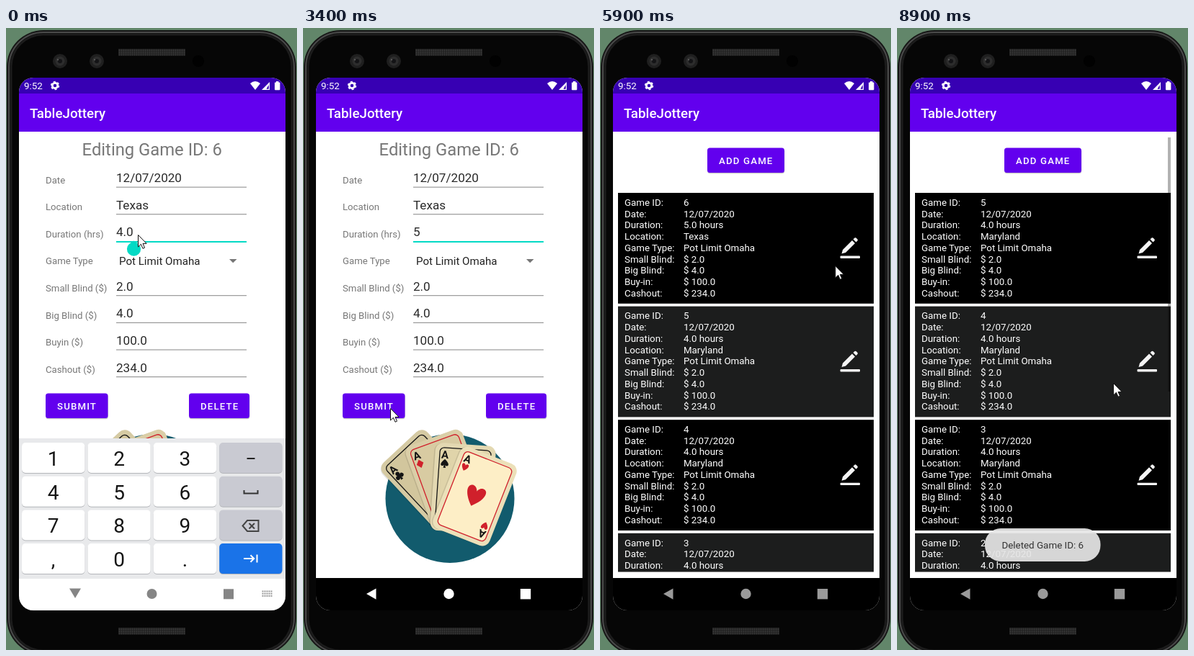
Recreate the animation shown at these times as an HTML page. Size 404x864 px, loop 9000 ms.

```html
<!DOCTYPE html>
<html lang="en">
<head>
<meta charset="utf-8">
<title>Game log</title>
<style>
html, body { margin: 0; width: 100%; height: 100%; overflow: hidden; background: #62866a; }
svg { display: block; width: 404px; height: 864px; font-family: Roboto, sans-serif; }
text { white-space: pre; }
</style>
</head>
<body>
<svg id="stage" viewBox="0 0 404 864" xmlns="http://www.w3.org/2000/svg"></svg>
<script>
const LOOP = 9000, STEP = 100;
const PURPLE = '#6200ee', TEAL = '#03dac5';
const stage = document.getElementById('stage');
const $ = id => document.getElementById(id);

const rect = (x, y, w, h, fill, rx = 0, more = '') =>
  `<rect x="${x}" y="${y}" width="${w}" height="${h}" fill="${fill}" rx="${rx}" ${more}/>`;
const text = (x, y, size, fill, str, more = '') =>
  `<text x="${x}" y="${y}" font-size="${size}" fill="${fill}" ${more}>${str}</text>`;
const path = (d, fill, more = '') => `<path d="${d}" fill="${fill}" ${more}/>`;
const disc = (x, y, r, fill, more = '') => `<circle cx="${x}" cy="${y}" r="${r}" fill="${fill}" ${more}/>`;
const group = (id, inner, more = '') => `<g id="${id}" ${more}>${inner}</g>`;

// phone body
function phone() {
  const grille = y => rect(156, y, 93, 9.5, '#222') + rect(156, y, 93, 9.5, 'url(#mesh)');
  const camera = x => disc(x, 46, 10, '#1f1f1f') + disc(x, 46, 6.5, '#2d2d2d') + disc(x, 46, 3, '#141416') +
    disc(x - 3, 44, 1.2, '#555');
  return rect(1, 3, 402, 868, '#151515', 51) +
    rect(4, 6, 396, 862, 'none', 48, 'stroke="#4a4a4a" stroke-width="2"') +
    rect(6, 8, 392, 858, '#1c1c1c', 46) + rect(8.5, 10.5, 387, 853, '#060606', 43) +
    grille(29) + grille(833) + camera(75) + camera(126) + disc(267, 46, 8, '#010101');
}

// page = coloured bars plus its own content
const page = (id, inner) => group(id,
  rect(18, 69, 370, 740, '#fff') + rect(18, 69, 370, 23, '#3700b3') + rect(18, 91, 370, 53, PURPLE) +
  rect(18, 764, 370, 45, '#000') +
  text(33, 125, 18.8, '#fff', 'TableJottery', 'font-weight="500"') + inner);

const button = (x, y, w, label) =>
  rect(x + .3, y + 1.2, w, 34.5, '#00000038', 3.5) + rect(x, y, w, 34.5, PURPLE, 3.5) +
  text(x + 16, y + 22, 13.2, '#fff', label, 'font-weight="500" letter-spacing="1.18"');

const RED = '#d0202b', INK = '#141414';
const SUITS = {
  heart: 'M0 5C-6-.5-5.5-5-2.7-5-1-5 0-3.2 0-2.6 0-3.2 1-5 2.7-5 5.5-5 6-.5 0 5Z',
  diamond: 'M0-6 5 0 0 6-5 0Z',
  spade: 'M0-6C7 0 6 3.5 3.2 3.5 1.6 3.5.8 2.4.6 1.8L1.8 6H-1.8L-.6 1.8C-.8 2.4-1.6 3.5-3.2 3.5-6 3.5-7 0 0-6Z',
  club: 'M-1.6-1.4A2.9 2.9 0 1 1 1.6-1.4 2.9 2.9 0 1 1 .8 2.4L1.8 6H-1.8L-.8 2.4A2.9 2.9 0 1 1-1.6-1.4Z'
};

function card(x, y, turn, suit, ink, rim, face) {
  const corner = text(13.8, 21.5, 15, INK, 'A', 'font-weight="700" text-anchor="middle"') +
    path(SUITS[suit], ink, 'transform="translate(14.2 28.4)"');
  const front = suit === 'heart'
    ? path(SUITS.heart, ink, 'transform="translate(42 61) scale(2.8)"') +
      `<g transform="rotate(180 42 61)">${corner}</g>` : '';
  return `<g transform="translate(${x} ${y}) rotate(${turn})">` +
    rect(-1.5, .5, 84, 122, '#0000001c', 11) + rect(0, 0, 84, 122, rim, 11) +
    rect(6.5, 6.5, 71, 109, face, 6, `stroke="${ink}" stroke-width="1.3"`) + corner + front + '</g>';
}

const art = disc(204, 653.5, 89.5, '#125b6d') +
  card(104, 611, -43, 'club', INK, '#d5caa3', '#d2c69d') +
  card(139.5, 583.5, -20, 'diamond', RED, '#dacea7', '#d8cba2') +
  card(184.5, 575.5, 4, 'spade', INK, '#e3d8b1', '#e0d4aa') +
  card(221.8, 578.5, 21.5, 'heart', RED, '#ece0b9', '#fdeec6');

const FIELDS = [['Date', '12/07/2020'], ['Location', 'Texas'], ['Duration (hrs)', ''],
  ['Game Type', 'Pot Limit Omaha'], ['Small Blind ($)', '2.0'], ['Big Blind ($)', '4.0'],
  ['Buyin ($)', '100.0'], ['Cashout ($)', '234.0']];

function editPage() {
  const rows = FIELDS.map(([label, value], i) => {
    const dy = i * 37.65;
    const name = text(55, 215.5 + dy, 13.2, '#777', label);
    if (i === 3) return name + text(157, 329, 15.1, '#222', value) + path('M310 321H320.5L315.2 326.3Z', '#757575');
    return name + text(153, 214 + dy, 17.1, '#2a2a2a', value, `id="value${i}"`) +
      rect(153, 220.6 + dy, 181, 1, '#858585', 0, `id="line${i}"`);
  }).join('');
  return page('edit',
    text(202.7, 177, 23.8, '#777', 'Editing Game ID: 6', 'text-anchor="middle"') + rows +
    rect(153, 296, 181, 2, TEAL, 0, 'id="focus"') + rect(0, 276.5, 2, 17, TEAL, 0, 'id="caret" opacity=".75"') +
    path('M177.5 295.5L184 300A9.6 9.6 0 1 1 171 300Z', TEAL, 'id="handle"') +
    button(55, 507.5, 86.5, 'SUBMIT') + button(254, 507.5, 84, 'DELETE') + art);
}

const LABELS = ['Game ID:', 'Date:', 'Duration:', 'Location:', 'Game Type:', 'Small Blind:', 'Big Blind:', 'Buy-in:', 'Cashout:'];

function listRow(id, n) {
  const first = id === 6;
  const values = [id, '12/07/2020', first ? '5.0 hours' : '4.0 hours', first ? 'Texas' : 'Maryland',
    'Pot Limit Omaha', '$ 2.0', '$ 4.0', '$ 100.0', '$ 234.0'];
  const lines = LABELS.map((label, i) =>
    text(34, 246.8 + i * 15.75, 13.3, '#fff', label) + text(116, 246.8 + i * 15.75, 13.3, '#fff', values[i])).join('');
  const pencil = path('M335.5 313.5L337 308 350 295 354 299 341 312ZM351.5 293.5L353.5 291.5Q354.5 290.8 355.5 291.5L357.5 293.5Q358.2 294.5 357.5 295.5L355.5 297.5Z', '#f4f4f4') +
    rect(333.5, 316.5, 27.5, 3.4, '#f4f4f4', 1);
  return `<g transform="translate(0 ${n * 157.6})">` + rect(25, 229, 355, 153.8, n % 2 ? '#1c1d1d' : '#000') + lines + pencil + '</g>';
}

const listPage = (id, top) => page(id,
  button(149, 166.5, 107, 'ADD GAME') +
  `<g clip-path="url(#rows)">${[0, 1, 2, 3].map(n => listRow(top - n, n)).join('')}</g>` +
  rect(376, 152, 4, 353, '#000', 0, `id="${id}Bar"`));

function keyboard() {
  const rows = ['123', '456', '789', ',0.'];
  let out = rect(18, 570, 370, 195, '#e8e9eb');
  rows.forEach((row, r) => {
    const y = 576 + r * 46.7;
    for (let c = 0; c < 4; c++) {
      const x = 22 + c * 91.4;
      out += rect(x, y + 1, 87.3, 42, '#b4b6ba', 5) +
        rect(x, y, 87.3, 42, c < 3 ? '#fff' : r < 3 ? '#c9cad2' : '#1a73e8', 5);
      if (c < 3) out += text(x + 43.6, y + 32, 28, '#151515', row[c], 'text-anchor="middle"');
    }
  });
  const line = (d, color) => path(d, 'none', `stroke="${color}" stroke-width="2"`);
  return out + line('M334.5 598H345.5', '#222') + line('M330.5 642V646.5H349.5V642', '#333') +
    line('M335 684H350.5V699H335L328.5 691.5ZM337.5 688L345 695.5M345 688L337.5 695.5', '#444') +
    line('M330 737H344M339.5 732.2L344.3 737 339.5 741.8M348.5 731.5V742.5', '#fff');
}

const lightNav = rect(18, 765, 370, 44, '#fff') + path('M88 778.5H104L96 792Z', '#858585') +
  disc(202.5, 786, 7, '#858585') + rect(302, 779.3, 14, 14, '#858585') +
  [0, 1, 2].map(r => [0, 1, 2, 3, 4].map(c => rect(355.5 + c * 3, 781.5 + r * 3.2, 2, 2, '#999')).join('')).join('');

const darkNav = path('M88 786L101.5 778.5V793.8Z', 'inherit') + disc(202.5, 786, 7.2, 'inherit') +
  rect(301.8, 779, 14.4, 14.4, 'inherit');

const status = text(25, 85, 13.4, '#fff', '9:52') +
  disc(68, 80, 3.7, 'none', 'stroke="#fff" stroke-width="2.8"') +
  disc(68, 80, 5.4, 'none', 'stroke="#fff" stroke-width="1.6" stroke-dasharray="2.9 2.75"') +
  path('M339 77Q346 71 353 77L346 86Z', '#fff') + path('M355 86H366V75Z', '#fff') + path('M361.5 84.8H364.8V79Z', '#3700b3') +
  rect(373, 75.5, 7.4, 10.7, '#fff', 1) + rect(375, 74, 3.4, 2, '#fff');

const toast = (id, x, w, str) => group(id,
  rect(x, 695, w, 46, '#e6e6e6', 22, 'opacity=".92"') +
  text(x + w / 2, 723, 13.4, '#333', str, 'text-anchor="middle"'));

stage.innerHTML = `<defs>
  <clipPath id="screen"><rect x="18" y="69" width="370" height="740" rx="20"/></clipPath>
  <clipPath id="rows"><rect x="18" y="144" width="370" height="611.5"/></clipPath>
  <pattern id="mesh" width="3" height="3" patternUnits="userSpaceOnUse"><circle cx="1.5" cy="1.5" r=".9" fill="#3a3a3a"/></pattern>
</defs>` + rect(0, 0, 404, 864, '#62866a') + phone() +
  `<g clip-path="url(#screen)">` + rect(18, 69, 370, 740, '#000') +
  group('pages', editPage() + listPage('listA', 6) + listPage('listB', 5)) +
  group('darkNav', darkNav) + group('keys', keyboard()) + group('lightNav', lightNav) +
  status + toast('saved', 88, 228.5, 'Successful Edits to Game ID: 6') + toast('deleted', 122, 160.5, 'Deleted Game ID: 6') + '</g>' +
  path('M0 0V16.5L3.9 12.8 6.5 18.8 9 17.7 6.5 11.9H11.6Z', '#fff', 'id="cursor" stroke="#111" stroke-width="1"');

const clamp = v => Math.max(0, Math.min(1, v));
const ramp = (t, a, b) => clamp((t - a) / (b - a));
const smooth = v => v * v * (3 - 2 * v);
const show = (id, alpha) => $(id).setAttribute('opacity', +alpha);

function bezier(x, [x0, y0, x1, y1, x2, y2, x3, y3]) {
  const at = (a, b, c, d, u) => ((1 - u) ** 3) * a + 3 * u * (1 - u) ** 2 * b + 3 * u * u * (1 - u) * c + u ** 3 * d;
  let lo = 0, hi = 1;
  for (let i = 0; i < 24; i++) {
    const mid = (lo + hi) / 2;
    if (at(x0, x1, x2, x3, mid) < x) lo = mid; else hi = mid;
  }
  return at(y0, y1, y2, y3, lo);
}
// quick start, very long settle
const settle = x => x <= 0 ? 0 : x >= 1 ? 1 : x < 1 / 6
  ? bezier(x, [0, 0, .05, 0, .1333, .06, .1667, .4])
  : bezier(x, [.1667, .4, .2083, .82, .25, 1, 1, 1]);

const POINTER = [[0, 183, 287], [1800, 183, 287], [2400, 95, 783], [2800, 95, 783], [3300, 121, 528],
  [3700, 121, 528], [4200, 165, 562], [5100, 165, 562], [6100, 345, 303], [6600, 345, 303],
  [6800, 314, 377], [7200, 306, 517], [7900, 306, 517], [8500, 300, 493], [9000, 300, 493]];
const SCREENS = [[-1000, 'edit'], [3640, 'listA'], [6615, 'edit'], [7749, 'listB']];
const TYPED = [[0, '4.0'], [300, '4.'], [500, '4'], [700, ''], [900, '5'], [6600, '5.0']];

const latest = (list, t) => list.reduce((k, item, i) => item[0] <= t ? i : k, 0);

function zoom(id, s, alpha) {
  $(id).setAttribute('transform', `translate(203 439) scale(${s}) translate(-203 -439)`);
  show(id, alpha);
}

function drawPages(t) {
  const k = latest(SCREENS, t), [start, top] = SCREENS[k];
  const dt = t - start, e = settle(dt / 400);
  ['edit', 'listA', 'listB'].forEach(id => show(id, 0));
  if (k && dt < 400) zoom(SCREENS[k - 1][1], 1 + .05 * e, 1);
  zoom(top, .85 + .15 * e, k ? ramp(dt, 52, 95) : 1);
  if ($('pages').lastElementChild !== $(top)) $('pages').append($(top));
}

function drawField(t) {
  const k = latest(TYPED, t), [since, str] = TYPED[k];
  const focused = t < 5000;
  $('value2').textContent = str;
  show('focus', focused);
  show('line2', !focused);
  show('handle', t < 300);
  const lit = k > 0 && focused && Math.floor((t - since) / 500) % 2 === 0;
  const width = [...str].reduce((w, ch) => w + (ch === '.' ? 4.5 : 9.6), 0);
  $('caret').setAttribute('x', 153.3 + width);
  show('caret', lit ? .75 : 0);
}

function draw(t) {
  drawPages(t);
  drawField(t);

  const hide = smooth(ramp(t, 2450, 2750));
  $('keys').setAttribute('transform', `translate(0 ${hide * 195})`);
  show('keys', hide < 1 ? 1 - hide * .5 : 0);
  show('lightNav', t < 2600);
  const shade = Math.round(255 - 101 * ramp(t, 5400, 5700));
  $('darkNav').setAttribute('fill', `rgb(${shade},${shade},${shade})`);

  show('listABar', .3 * (1 - ramp(t, 4900, 5150)));
  show('listBBar', .3);
  show('saved', ramp(t, 3640, 3740) * (1 - ramp(t, 5600, 5900)));
  show('deleted', ramp(t, 7750, 7850));

  const i = Math.min(latest(POINTER, t), POINTER.length - 2);
  const [a, x, y] = POINTER[i], [b, x2, y2] = POINTER[i + 1];
  const p = smooth(ramp(t, a, b));
  $('cursor').setAttribute('transform', `translate(${x + (x2 - x) * p + .5} ${y + (y2 - y) * p + .5})`);
}

const origin = performance.now();
function tick() {
  const t = (performance.now() - origin) % LOOP;
  draw(Math.floor(t / STEP) * STEP);
  requestAnimationFrame(tick);
}
tick();
</script>
</body>
</html>
```
